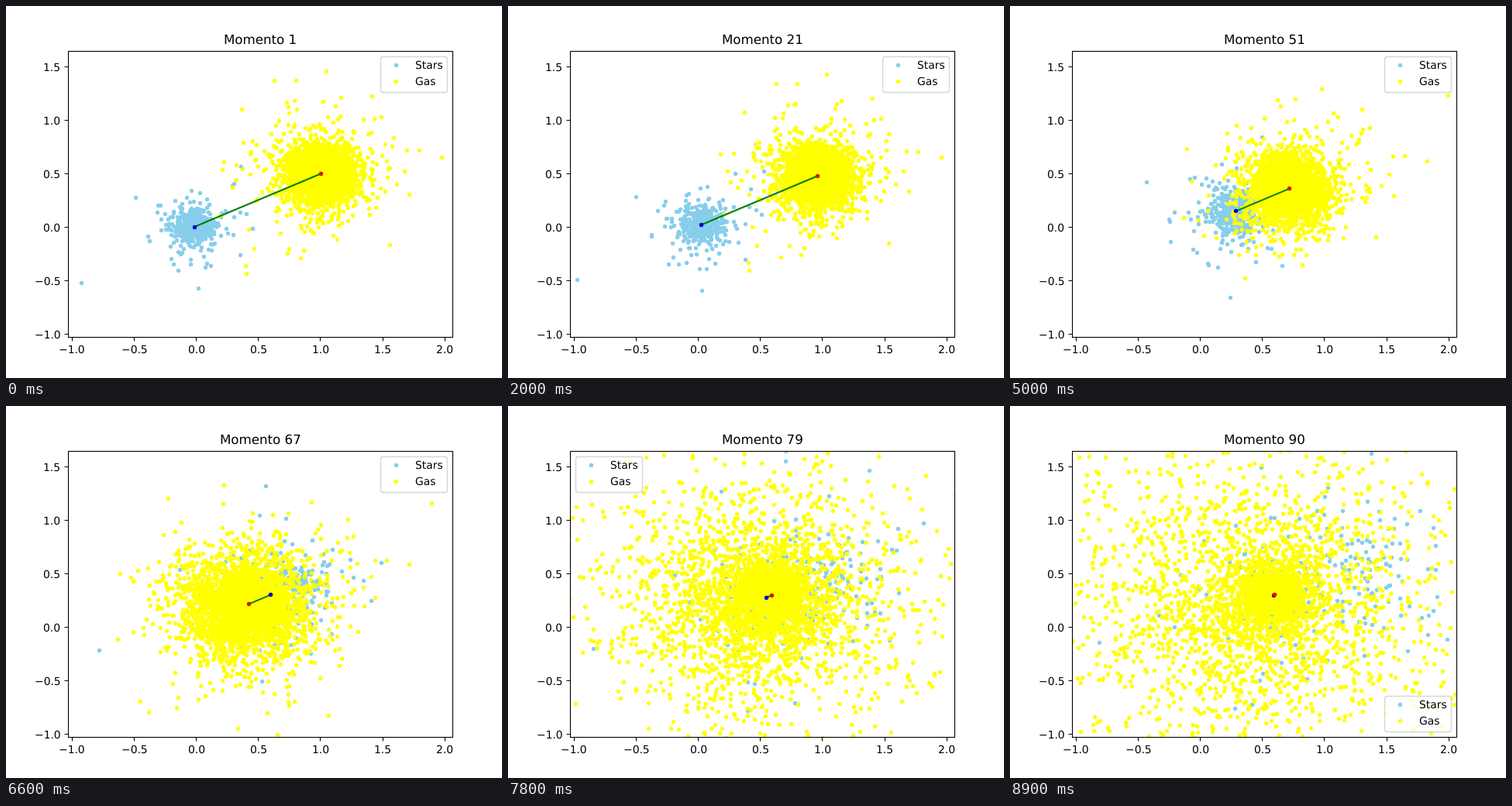
An HTML page with a canvas for the animation above (9 s loop, 640 px wide and 480 px high).

```html
<!DOCTYPE html>
<html lang="en">
<head>
<meta charset="utf-8">
<title>Momento</title>
<style>
html, body { margin: 0; width: 100%; height: 100%; overflow: hidden; background: #fff; }
canvas { display: block; }
</style>
</head>
<body>
<canvas id="stage" width="640" height="480"></canvas>
<script>
const ctx = document.getElementById('stage').getContext('2d');
const SKY = '#87ceeb', GAS = '#ffff00';
const ASPECT = 0.86, LIFT_OFF = 58;
const MIDDLE = { x: 340, y: 244 };

// Step, x of the star centre, x of the gas centre
const PATH = [
  [0, 243, 406], [20, 249, 399], [33, 262, 388], [50, 291, 360],
  [66, 341, 313], [78, 333, 340], [89, 340, 341]
];

let seed = 20251;
function rand() {
  seed = (seed + 0x6d2b79f5) | 0;
  let t = Math.imul(seed ^ (seed >>> 15), 1 | seed);
  t = (t + Math.imul(t ^ (t >>> 7), 61 | t)) ^ t;
  return ((t ^ (t >>> 14)) >>> 0) / 4294967296;
}

// Radius of an exponential disc
const discRadius = h => -h * Math.log((1 - rand()) * (1 - rand()));

// Hermite curve through one column of PATH, at rest at both ends
function pathX(col, k) {
  const last = PATH.length - 1;
  const slope = i => i === 0 || i === last ? 0
    : (PATH[i + 1][col] - PATH[i - 1][col]) / (PATH[i + 1][0] - PATH[i - 1][0]);
  let i = 0;
  while (i < last - 1 && k >= PATH[i + 1][0]) i++;
  const a = PATH[i], b = PATH[i + 1], w = b[0] - a[0];
  const s = (k - a[0]) / w, s2 = s * s, s3 = s2 * s;
  return a[col] + (3 * s2 - 2 * s3) * (b[col] - a[col])
    + w * ((s3 - 2 * s2 + s) * slope(i) + (s3 - s2) * slope(i + 1));
}

// Both centres travel on one straight line
function centre(col, k) {
  const x = pathX(col, k);
  return { x, y: 285 - 0.42 * (x - 243) };
}

function makeCloud(count, { inner = 0, h, freeShare = 0, speed = 0, drift = [0, 0] }) {
  return Array.from({ length: count }, () => {
    const r = inner + discRadius(h), angle = rand() * 2 * Math.PI;
    const spin = (rand() - 0.5) * 2.4 / (r + 8);
    const dir = rand() * 2 * Math.PI, v = discRadius(speed);
    const free = rand() < freeShare ? 1 : 0;
    return {
      r, angle, spin,
      vx: free * (v * Math.cos(dir) + drift[0]),
      vy: free * (v * Math.sin(dir) * ASPECT + drift[1])
    };
  });
}

const stars = [
  ...makeCloud(500, { h: 8, freeShare: 0.3, speed: 1.8, drift: [4, -1.4] }),
  ...makeCloud(16, { inner: 42, h: 18 })
];
const gas = makeCloud(4000, { h: 12, freeShare: 0.6, speed: 2.8, drift: [-1.2, 0.6] });
const farGas = makeCloud(55, { inner: 65, h: 24 });
const STREAM = 30;

function place(p, c, k, grow) {
  const a = p.angle + p.spin * k, r = p.r * grow;
  const t = Math.max(0, k - LIFT_OFF), flight = t - 0.004 * t * t;
  return [
    c.x + r * Math.cos(a) + p.vx * flight,
    c.y + r * Math.sin(a) * ASPECT + p.vy * flight
  ];
}

const mix = (a, b, s) => ({ x: a.x + (b.x - a.x) * s, y: a.y + (b.y - a.y) * s });
const snap = v => Math.floor(v) + 0.5;

function dot(x, y, color) {
  ctx.fillStyle = color;
  ctx.beginPath();
  ctx.arc(snap(x), snap(y), 2.7, 0, 2 * Math.PI);
  ctx.fill();
}

// Text starts on a whole pixel; anchor 0 is left, 0.5 centre, 1 right
function text(s, x, y, anchor = 0, size = 13.89) {
  ctx.font = size + 'px "DejaVu Sans", sans-serif';
  ctx.textRendering = 'geometricPrecision';
  ctx.fillStyle = '#000';
  ctx.fillText(s, Math.round(x - anchor * ctx.measureText(s).width), y);
}

function drawPoints(k) {
  const cs = centre(1, k), cg = centre(2, k);
  const fall = (k / 50) ** 2, early = Math.min(1, fall);

  for (const p of stars) dot(...place(p, cs, k, 1 + 0.4 * early), SKY);

  // A thin stream of gas is pulled over to the stars
  const pulled = mix(cg, cs, early);
  gas.forEach((p, i) => {
    const streaming = i < STREAM;
    dot(...place(p, streaming ? pulled : cg, k, 1 + (streaming ? 0.6 : 0.15) * early), GAS);
  });

  // Far gas falls slowly towards the middle
  const start = centre(2, 0);
  for (const p of farGas) {
    const [x, y] = place(p, start, 0, 1);
    const at = mix({ x, y }, MIDDLE, 25 * fall / Math.hypot(MIDDLE.x - x, MIDDLE.y - y));
    dot(at.x, at.y, GAS);
  }

  ctx.strokeStyle = '#008000';
  ctx.lineWidth = 2.08;
  ctx.beginPath();
  ctx.moveTo(cs.x, cs.y);
  ctx.lineTo(cg.x, cg.y);
  ctx.stroke();
  dot(cs.x, cs.y, '#0000d0');
  dot(cg.x, cg.y, '#d01800');
}

function drawAxes() {
  ctx.strokeStyle = '#000';
  ctx.lineWidth = 1.1;
  ctx.strokeRect(80.5, 58.5, 496, 369);
  const label = v => v.toFixed(1).replace('-', '\u2212');
  ctx.beginPath();
  for (let v = -1; v <= 2; v += 0.5) {
    const x = 245.6 + 160.35 * v;
    ctx.moveTo(snap(x), 428);
    ctx.lineTo(snap(x), 432.5);
    text(label(v), x, 448, 0.5);
  }
  for (let v = -1; v <= 1.5; v += 0.5) {
    const y = snap(285.4 - 138 * v);
    ctx.moveTo(80, y);
    ctx.lineTo(75.5, y);
    text(label(v), 70.3, y + 5.5, 1);
  }
  ctx.stroke();
}

// The legend moves to the emptiest corner
function drawLegend(k) {
  const x = k >= 73 && k < 84 ? 87 : 483, y = k >= 84 ? 374 : 65;
  ctx.beginPath();
  ctx.roundRect(x + 0.5, y + 0.5, 86, 46, 3);
  ctx.fillStyle = 'rgba(255,255,255,0.8)';
  ctx.fill();
  ctx.strokeStyle = 'rgba(204,204,204,0.8)';
  ctx.lineWidth = 1.39;
  ctx.stroke();
  dot(x + 20, y + 11, SKY);
  dot(x + 20, y + 32, GAS);
  text('Stars', x + 45, y + 16);
  text('Gas', x + 45, y + 37);
}

function draw(k) {
  ctx.fillStyle = '#fff';
  ctx.fillRect(0, 0, 640, 480);
  ctx.save();
  ctx.beginPath();
  ctx.rect(80, 58, 496, 369);
  ctx.clip();
  drawPoints(k);
  ctx.restore();
  drawAxes();
  drawLegend(k);
  text('Momento ' + (k + 1), 328, 49, 0.5, 16.67);
}

let shown = -1;
function tick() {
  const k = Math.floor(performance.now() % 9000 / 100);
  if (k !== shown) draw(shown = k);
  requestAnimationFrame(tick);
}
tick();
</script>
</body>
</html>
```
